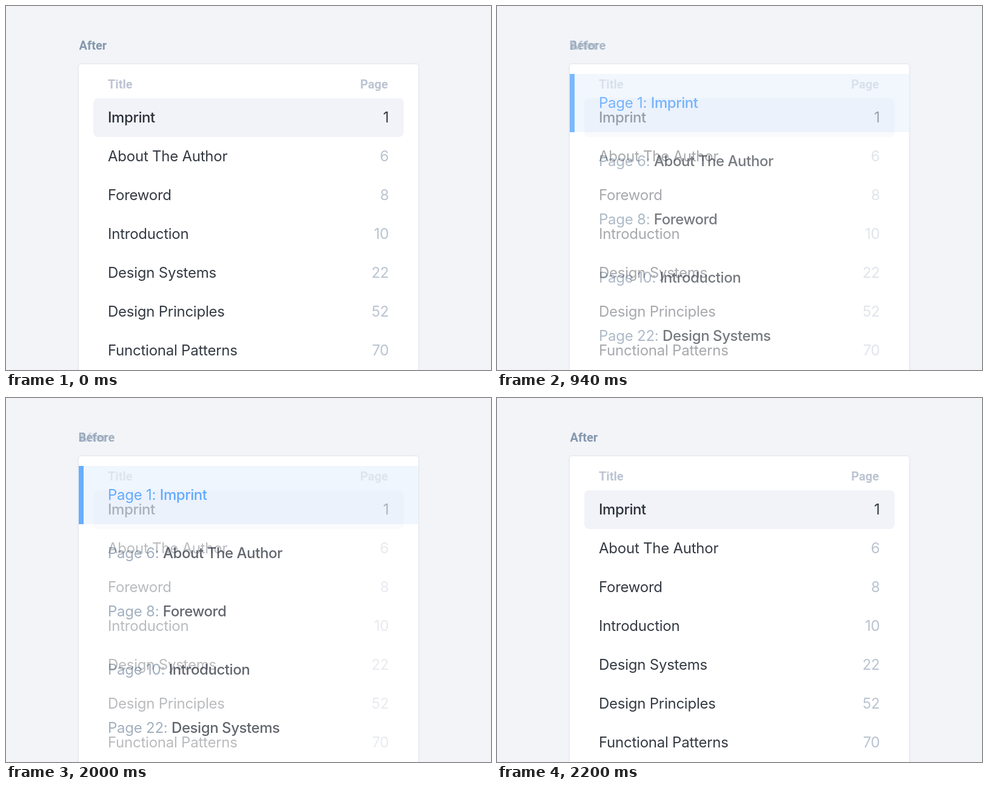
An HTML page for the animation above (2.28 s loop, 800x600 px).

```html
<!DOCTYPE html>
<html lang="en">
<head>
<meta charset="utf-8">
<title>Table of contents: before and after</title>
<style>
  html, body { margin: 0; width: 100%; height: 100%; overflow: hidden; background: #f2f4f8; }
  svg { display: block; width: 800px; height: 600px; }
  text {
    font: 400 24px Inter, sans-serif;
    font-optical-sizing: none;
    letter-spacing: -.01em;
    white-space: pre;
    fill: #343a43;
  }
  .label { font: 700 20px Roboto, sans-serif; letter-spacing: 0; fill: #8497ad; }
  .head { fill: #bcc4d2; }
  .num { fill: #bac3d1; }
  .page { fill: #8294aa; }
  .strong { font-weight: 500; letter-spacing: -.018em; fill: #2c323b; }
  .active { fill: #3392ff; }
  .end { text-anchor: end; }
  .card { fill: #fff; filter: drop-shadow(0 0 1.5px rgba(70, 95, 130, .2)); }
  .row { fill: #f2f3f8; mix-blend-mode: multiply; }
</style>
</head>
<body>
<svg viewBox="0 0 800 600">
  <rect width="800" height="600" fill="#f2f4f8"/>
  <rect class="card" x="120" y="96" width="560" height="540" rx="4"/>

  <g class="before">
    <rect x="120" y="112" width="560" height="96" fill="#ebf3fe"/>
    <rect x="120" y="112" width="8" height="96" fill="#3393ff"/>
  </g>
  <rect class="after row" x="144" y="152" width="512" height="64" rx="8"/>

  <g class="before" id="beforeText">
    <text class="label" x="119.4" y="72">Before</text>
  </g>
  <g class="after" id="afterText">
    <text class="label" x="120.5" y="72">After</text>
    <text class="label head" x="168" y="136">Title</text>
    <text class="label head end" x="630" y="136">Page</text>
  </g>
</svg>
<script>
const NS = 'http://www.w3.org/2000/svg';
const LOOP = 2280, STEP = 20, STEPS = 15;
const TO_BEFORE = 780, TO_AFTER = 1920;

const chapters = [
  ['Imprint', 1],
  ['About The Author', 6],
  ['Foreword', 8],
  ['Introduction', 10],
  ['Design Systems', 22],
  ['Design Principles', 52],
  ['Functional Patterns', 70]
];

const beforeText = document.getElementById('beforeText');
const afterText = document.getElementById('afterText');
const beforeParts = document.querySelectorAll('.before');
const afterParts = document.querySelectorAll('.after');

function add(parent, tag, cls, content, pos = {}) {
  const el = document.createElementNS(NS, tag);
  el.setAttribute('class', cls);
  for (const key in pos) el.setAttribute(key, pos[key]);
  el.textContent = content;
  parent.appendChild(el);
  return el;
}

chapters.forEach(([title, page], i) => {
  const first = i === 0;
  const y = 192 + i * 64;
  add(afterText, 'text', first ? 'strong' : '', title, { x: 168, y });
  add(afterText, 'text', first ? 'end' : 'end num', page, { x: 631.5, y });

  if (i > 4) return;
  const line = add(beforeText, 'text', '', '', { x: 168, y: 168 + i * 96 });
  add(line, 'tspan', first ? 'active' : 'page', `Page ${page}: `);
  add(line, 'tspan', first ? 'strong active' : 'strong', title);
});

// Eased progress of a fade that advances in fixed steps.
function fade(t, start) {
  const n = Math.floor((t - start) / STEP) + 1;
  const k = Math.min(Math.max(n / STEPS, 0), 1);
  return k * k * (3 - 2 * k);
}

function setOpacity(parts, value) {
  parts.forEach(el => el.setAttribute('opacity', value));
}

function draw(now) {
  const t = now % LOOP;
  const p = fade(t, TO_BEFORE) - fade(t, TO_AFTER);
  setOpacity(beforeParts, p);
  setOpacity(afterParts, Math.pow(1 - p, .8));
}

function tick() {
  draw(performance.now());
  requestAnimationFrame(tick);
}

draw(0);
requestAnimationFrame(tick);
</script>
</body>
</html>
```
